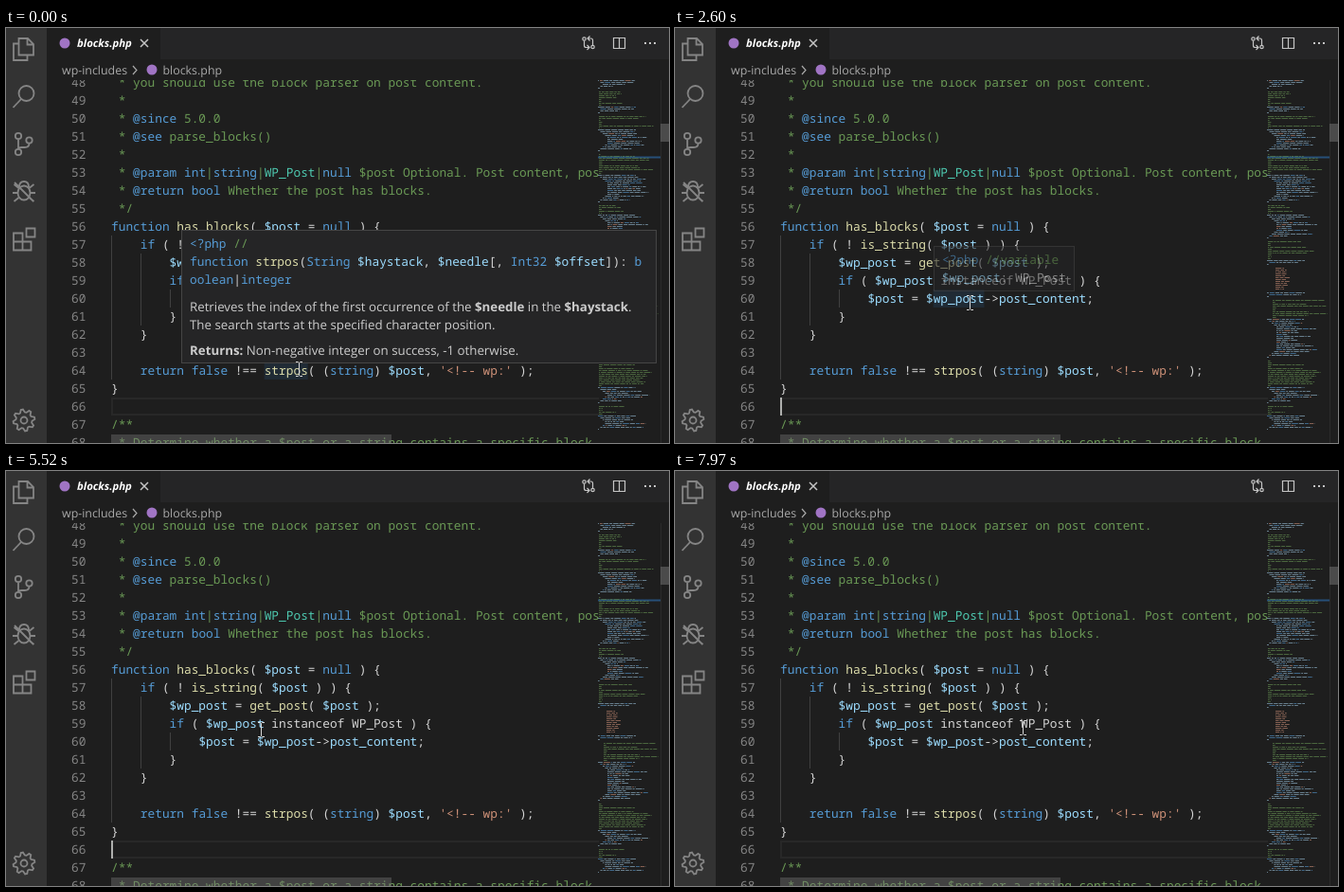
These frames come from a looping animation (700 by 438 pixels, 8 s). An HTML page:

```html
<!DOCTYPE html>
<html lang="en">
<head>
<meta charset="utf-8">
<title>Editor hover hints</title>
<style>
html, body { margin: 0; width: 100%; height: 100%; overflow: hidden; background: #1e1e1e; }
svg { display: block; width: 700px; height: 438px; }
text { white-space: pre; text-rendering: geometricPrecision; fill: #d4d4d4; }
.mono { font: 500 12.83px "Noto Sans Mono", "DejaVu Sans Mono", monospace; }
.ui { font: 12.4px "Open Sans", "Noto Sans", sans-serif; fill: #a9a9a9; }
.tab { font: italic 700 11.4px "Open Sans", "Noto Sans", sans-serif; fill: #fff; }
.doc { font: 13.3px "Open Sans", "Noto Sans", sans-serif; fill: #ccc; }
.doc tspan { font-weight: 700; }
.num { fill: #858585; text-anchor: end; }
.key { fill: #569cd6; } .var { fill: #9cdcfe; } .fn { fill: #dcdcaa; }
.str { fill: #ce9178; } .com { fill: #6a9955; } .type { fill: #4ec9b0; }
.tip > rect { fill: #252526; stroke: #454545; }
.icons { fill: none; stroke: #858585; stroke-width: 1.8; }
.word { fill: #264f78; fill-opacity: .25; }
</style>
</head>
<body>
<svg viewBox="0 0 700 438">
  <rect width="700" height="438" fill="#1e1e1e"/>
  <rect x="112" y="391" width="530" height="17" fill="none" stroke="#282828" stroke-width="2"/>
  <path d="M111.5 219V371M142.5 238V314M173.5 276V295" stroke="#404040"/>
  <g id="words"></g>
  <g id="code" class="mono"></g>
  <rect id="caret" x="111" y="390" width="2" height="19" fill="#aeafad"/>
  <rect x="111" y="429" width="296" height="9" fill="#797979" fill-opacity=".4"/>

  <rect x="626" y="55" width="74" height="383" fill="#1e1e1e"/>
  <path d="M625 136.500H691" stroke="#264f78" stroke-width="2"/>
  <g id="map" fill="none" opacity=".58"></g>
  <path d="M691.5 55V438" stroke="#2b2b2b"/>
  <rect x="691" y="101" width="9" height="19" fill="#797979" fill-opacity=".5"/>

  <rect x="43" width="657" height="55" fill="#1e1e1e"/>
  <rect x="163" width="537" height="33" fill="#252526"/>
  <g fill="#a074c4"><circle cx="62" cy="16" r="5.500"/><circle cx="154" cy="44" r="5.500"/></g>
  <text class="tab" x="75" y="20">blocks.php</text>
  <text class="ui" x="59" y="48.500">wp-includes</text>
  <text class="ui" x="165.500" y="48.500">blocks.php</text>
  <g fill="none" stroke="#c5c5c5" stroke-width="1.200">
    <path d="M134 40l4 4.500-4 4.500" stroke="#a9a9a9"/>
    <path d="M142 12l8 8m0-8l-8 8" stroke-width="1.500"/>
    <path d="M641.500 10.500h12v11h-12zM647.500 10v11"/>
    <path d="M610.500 13.500v5q0 2 2 2h3m-2-2.500l2.500 2.500-2.500 2.500M619.500 18v-5q0-2-2-2h-3m2-2.500l-2.500 2.500 2.500 2.500"/>
    <circle cx="610.500" cy="11.500" r="1.700"/><circle cx="619.500" cy="20" r="1.700"/>
  </g>
  <path d="M674 15h2v2h-2zM679 15h2v2h-2zM684 15h2v2h-2z" fill="#c5c5c5"/>

  <rect width="43" height="438" fill="#333"/>
  <g class="icons">
    <path d="M13.500 11h9.500l6 6v11.500h-15.500zM22.500 11v6.500h6.500M13.500 16.500h-5.500v17.500h14.500v-5.500"/>
    <circle cx="21.500" cy="69" r="8"/><path d="M16 75l-8.500 9"/>
    <circle cx="13" cy="114" r="3.200"/><circle cx="13" cy="131" r="3.200"/><circle cx="24.500" cy="118.500" r="3.200"/>
    <path d="M13 117.500v10M24.500 122q0 4-5 4h-3q-3.500 0-3.500 2"/>
    <ellipse cx="19" cy="174" rx="6.500" ry="7.500"/>
    <path d="M14 168q0-6 5-6t5 6M13 174H7M25 174h6M13.500 169l-5-4M24.500 169l5-4M13.500 179l-5 4M24.500 179l5 4M9 163l20 20"/>
    <path d="M8 216.500h9.500v18h-9.500zM8 225.500h18.500v9h-9M26.500 225v9.500M21.500 211.500h9v9h-9z"/>
    <circle cx="19" cy="414" r="3.500"/><polygon id="gear"/>
  </g>
  <g id="tips"></g>
  <path id="mouse" d="M-3.500-7.500h2.500l1 1 1-1h2.500M0-6.500V6.500M-3.500 7.500h2.500l1-1 1 1h2.500" fill="none" stroke="#d8d8d8"/>
</svg>
<script>
const $ = id => document.getElementById(id);
const esc = s => s.replace(/&/g, '&amp;').replace(/</g, '&lt;');
const CHAR = 7.697, LEFT = 111, LINE = 19;
const lineTop = n => 390 + (n - 66) * LINE;

const KINDS = ['com', 'str', 'var', 'key', 'fn'];
const CODE = /(\/\/.*|\/\*\*)|('[^']*')|(\$\w+|post_content)|(<\?php|\b(?:function|if|return|false|null|string|String|Int32|b$|oolean|integer)\b)|(\w+(?=\())/g;
const DOC = /(@\w+)|\b(int|string|null|bool)(?=[|]| W| \$)|(WP_Post)/g;

function paint(s) {
  if (s.startsWith(' *')) {
    const body = esc(s).replace(DOC, (m, tag, prim) =>
      `<tspan class="${tag || prim ? 'key' : 'type'}">${m}</tspan>`);
    return `<tspan class="com">${body}</tspan>`;
  }
  let out = '', last = 0;
  for (const m of s.matchAll(CODE)) {
    const kind = KINDS[m.slice(1).findIndex(Boolean)];
    out += esc(s.slice(last, m.index)) + `<tspan class="${kind}">${esc(m[0])}</tspan>`;
    last = m.index + m[0].length;
  }
  return out + esc(s.slice(last));
}
const text = (x, y, body, cls = '') => `<text class="${cls}" x="${x}" y="${y}">${body}</text>`;

const source = ` * you should use the block parser on post content.
 *
 * @since 5.0.0
 * @see parse_blocks()
 *
 * @param int|string|WP_Post|null $post Optional. Post content, post
 * @return bool Whether the post has blocks.
 */
function has_blocks( $post = null ) {
    if ( ! is_string( $post ) ) {
        $wp_post = get_post( $post );
        if ( $wp_post instanceof WP_Post ) {
            $post = $wp_post->post_content;
        }
    }

    return false !== strpos( (string) $post, '<!-- wp:' );
}

/**
 * Determine whether a $post or a string contains a specific block type`;
$('code').innerHTML = source.split('\n').map((s, i) => {
  const n = 48 + i, y = lineTop(n) + 14;
  return text(84.5, y, n, 'num') + text(LEFT, y, paint(s));
}).join('');

$('gear').setAttribute('points', Array.from({ length: 32 }, (_, i) => {
  const r = (i + 1) % 4 < 2 ? 11.5 : 8.5, a = (i - .5) * Math.PI / 16;
  return `${(19 + r * Math.sin(a)).toFixed(1)},${(414 - r * Math.cos(a)).toFixed(1)}`;
}).join(' '));

// Hover hints: box, code rows, hovered word [line, column, length], times shown.
const tips = [
  { x: 185.5, y: 213.5, w: 501, h: 140, word: [64, 21, 6], on: -200, off: 1000,
    rows: ['<?php //', 'function strpos(String $haystack, $needle[, Int32 $offset]): b', 'oolean|integer'],
    docs: [[299, 'Retrieves the index of the first occurrence of the <tspan>$needle</tspan> in the <tspan>$haystack</tspan>.'],
      [318, 'The search starts at the specified character position.'],
      [344.5, '<tspan>Returns:</tspan> Non-negative integer on success, -1 otherwise.']] },
  { x: 273.5, y: 230.5, w: 148, h: 47, word: [60, 21, 7], on: 2550, off: 4550,
    rows: ['<?php //variable', '$wp_post: WP_Post'], docs: [] },
  { x: 180.5, y: 192.5, w: 140, h: 47, word: [58, 9, 7], on: 6215, off: 7290,
    rows: ['<?php //variable', '$wp_post: mixed'], docs: [] }
];
$('words').innerHTML = tips.map(({ word: [n, col, len] }) =>
  `<rect class="word" x="${LEFT + col * CHAR}" y="${lineTop(n)}" width="${len * CHAR}" height="${LINE}"/>`).join('');
$('tips').innerHTML = tips.map(({ x, y, w, h, rows, docs }) =>
  `<g class="tip"><rect x="${x}" y="${y}" width="${w}" height="${h}"/>` +
  rows.map((s, i) => text(x + 8.5, y + 18 + i * LINE, paint(s), 'mono')).join('') +
  docs.map(([dy, s]) => text(x + 8.5, dy, s, 'doc')).join('') + '</g>').join('');

// Minimap: blocks of [rows, kind] filled with random word strokes.
let seed = 7;
const rnd = () => (seed = seed * 16807 % 2147483647) / 2147483647;
const blocks = [[6, 'c'], [8, 'd'], [5, 'c'], [7, 'D'], [13, 'c'], [11, 'D'], [16, 'c'], [5, 'd'],
  [14, 'c'], [10, 'D'], [4, 'c'], [13, 'a'], [4, 'c'], [10, 'i'], [22, 'c'], [14, 'D'],
  [10, 'c'], [5, 'd'], [9, 'c']];
const strokes = { '#6a9955': '', '#9cc4dd': '', '#569cd6': '', '#ce9178': '' };
let row = 55.5;
for (const [count, kind] of blocks) {
  const note = 'dDi'.includes(kind);
  for (let i = 0; i < count; i++, row += 2) {
    const edge = i == count - 1;
    if (edge && !note) continue;
    const deep = Math.min(i, count - 2 - i, 4);
    let x = 625 + (kind == 'a' ? 9 : kind == 'i' ? 6 : note ? 1 : deep * 2.5);
    const len = kind == 'a' ? 8 + rnd() * 8
      : note ? (rnd() < .4 || edge ? 4 : kind == 'd' ? 28 : 58) * (.6 + rnd() * .4)
      : deep ? 12 + rnd() * 34 : i ? 2 : 40;
    const end = Math.min(x + len, 690);
    while (x < end) {
      const w = Math.min(1 + rnd() * 6, end - x), r = rnd();
      const color = note ? '#6a9955' : kind == 'a' ? '#ce9178'
        : r < .2 ? '#569cd6' : r < .26 ? '#ce9178' : '#9cc4dd';
      strokes[color] += `M${x.toFixed(1)} ${row}h${w.toFixed(1)}`;
      x += w + 1;
    }
  }
}
$('map').innerHTML = Object.entries(strokes).map(([c, d]) => `<path d="${d}" stroke="${c}"/>`).join('');

const blinks = [410, 890, 1400, 1890, 2370, 2880, 3390, 3850, 4360, 4880, 5340, 5850, 6360, 6820, 7320, 7820];
const path = [[0, 309, 360], [930, 309, 360], [1070, 308, 373], [1250, 307, 380], [1400, 307, 380],
  [2170, 311, 296], [2370, 311, 290], [4500, 311, 290], [4680, 312, 311], [5340, 312, 311],
  [5520, 269, 273], [5980, 217, 256], [7230, 217, 256], [7970, 367, 271], [8000, 367, 271]];
const tipEls = [...$('tips').children], wordEls = [...$('words').children];

function draw(t) {
  const i = path.findIndex(p => p[0] > t);
  const [t0, x0, y0] = path[i - 1], [t1, x1, y1] = path[i], k = (t - t0) / (t1 - t0);
  $('mouse').setAttribute('transform',
    `translate(${Math.round(x0 + (x1 - x0) * k) + .5} ${Math.round(y0 + (y1 - y0) * k)})`);
  $('caret').setAttribute('opacity', blinks.filter(b => b <= t).length % 2);
  tips.forEach(({ on, off }, j) => {
    const a = t < off ? Math.max(0, Math.min(1, (t - on) / 90)) : 0;
    tipEls[j].setAttribute('opacity', a);
    wordEls[j].setAttribute('opacity', a > 0 ? 1 : 0);
  });
}
const start = performance.now();
(function tick() {
  draw((performance.now() - start) % 8000);
  requestAnimationFrame(tick);
})();
</script>
</body>
</html>
```
